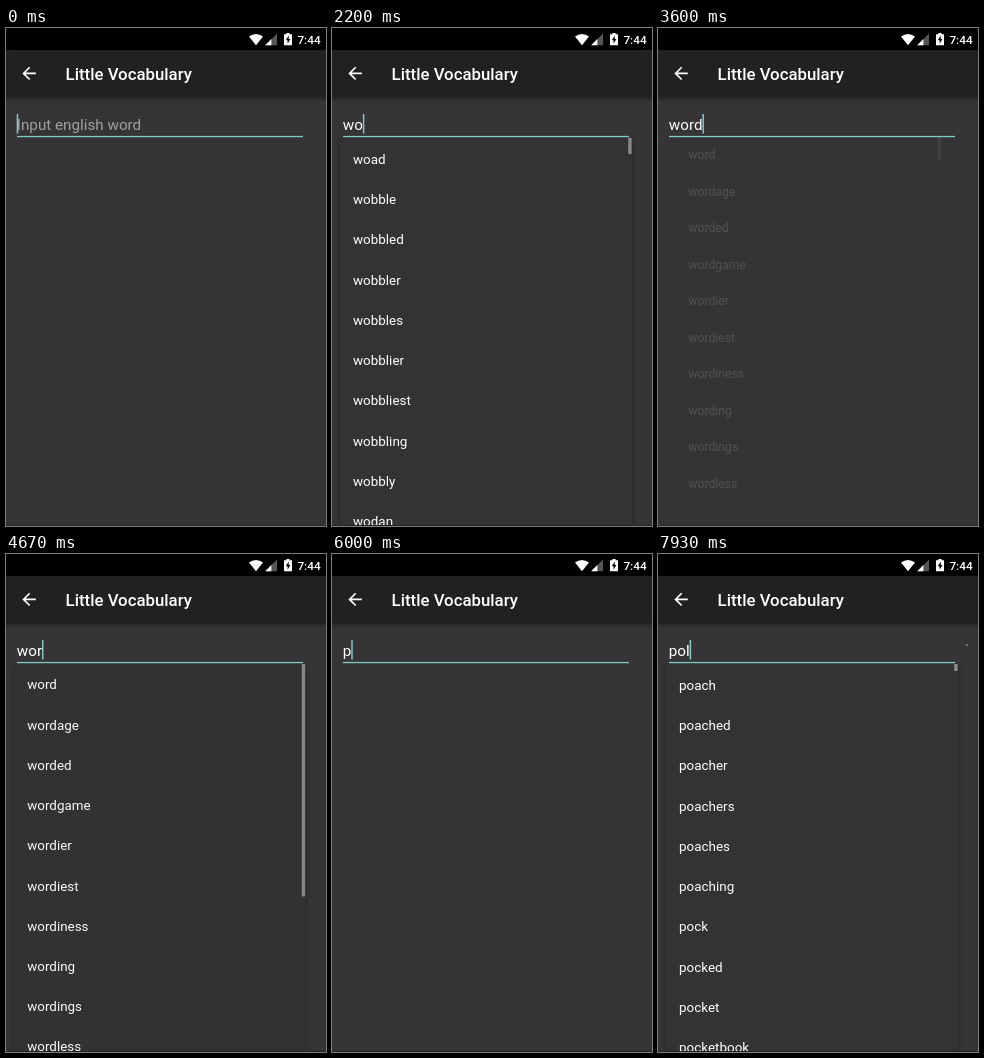
An HTML page that plays this animation: 320 by 498 pixels, repeating every 8 s.

```html
<!DOCTYPE html>
<html lang="en">
<head>
<meta charset="utf-8">
<title>Little Vocabulary</title>
<style>
  html, body { margin: 0; width: 100%; height: 100%; overflow: hidden; background: #373437; }
  svg { display: block; width: 320px; height: 498px; font-family: Roboto, sans-serif; fill: #fff; }
  .field { font-size: 15.22px; }
  #list { font-size: 13.44px; }
</style>
</head>
<body>
<svg viewBox="0 0 320 498">
  <defs>
    <linearGradient id="fall" x1="0" y1="0" x2="0" y2="1">
      <stop offset="0" stop-opacity=".3"/><stop offset="1" stop-opacity="0"/>
    </linearGradient>
    <filter id="blur" x="-10%" y="-10%" width="120%" height="120%"><feGaussianBlur stdDeviation="2.5"/></filter>
    <clipPath id="win"><rect x="0" y="109.5" width="310" height="390"/></clipPath>
  </defs>

  <rect width="320" height="498" fill="#373437"/>

  <!-- status bar -->
  <rect width="320" height="22" fill="#000"/>
  <path d="M243 8.6Q250 3.4 257 8.6L250 17.2Z"/>
  <path d="M271 5.6V17.2H259.2Z" fill="#555"/>
  <path d="M265.4 11.1V17.2H259.2Z"/>
  <path d="M280.4 5H283.6V6.2H286V17.2H278V6.2H280.4Z"/>
  <path d="M282.7 7.6L279.8 12.3H281.6V15.8L284.4 11H282.7Z" fill="#000"/>
  <text x="291.4" y="16.2" font-size="11.8" font-weight="500">7:44</text>

  <!-- app bar -->
  <rect y="22" width="320" height="47" fill="#232023"/>
  <rect y="69" width="320" height="5" fill="url(#fall)"/>
  <path transform="translate(13 35.3) scale(.84)"
    d="M20 11H7.83l5.59-5.59L12 4l-8 8 8 8 1.41-1.41L7.83 13H20z"/>
  <text x="59.6" y="52" font-size="16.8" font-weight="500">Little Vocabulary</text>

  <!-- suggestions -->
  <g id="popup" clip-path="url(#win)">
    <rect x="8" y="111" width="292" height="400" fill="#000" opacity=".35" filter="url(#blur)"/>
    <rect x="8" y="109.5" width="292" height="400" fill="#353235"/>
    <g id="list"></g>
    <rect id="thumb" x="296.2" y="110" width="3.4" fill="#8b898b"/>
  </g>

  <!-- input -->
  <text id="hint" class="field" x="10.8" y="102" fill="#a09ea0">Input english word</text>
  <text id="typed" class="field" x="10.8" y="102"></text>
  <rect x="11" y="107.9" width="286" height="1.3" fill="#80cbc4"/>
  <rect id="cursor" y="86" width="1.5" height="19.5" fill="#80cbc4"/>
  <circle id="spin" cx="308" cy="96.5" r="5.4" pathLength="1" fill="none"
    stroke="#80cbc4" stroke-width="1.2" stroke-linecap="square"/>

  <rect y="497" width="320" height="1" fill="#252325"/>
</svg>
<script>
const LOOP = 8000, FPS = 15, BLINK = 505, FADE = 150, ROW = 40.3;
const $ = id => document.getElementById(id);
const [popup, list, thumb, hint, typed, cursor, spin] =
  ['popup', 'list', 'thumb', 'hint', 'typed', 'cursor', 'spin'].map($);

const words = {
  wo: 'woad wobble wobbled wobbler wobbles wobblier wobbliest wobbling wobbly wodan',
  wor: 'word wordage worded wordgame wordier wordiest wordiness wording wordings wordless',
  po: 'poach poached poacher poachers poaches poaching pock pocked pocket pocketbook'
};
// [time, field content]
const edits = [[-440, ''], [465, 'w'], [1065, 'wo'], [2530, 'wor'], [3465, 'word'], [4465, 'wor'],
  [4950, 'wo'], [5130, 'w'], [5198, ''], [5998, 'p'], [7060, 'po'], [7865, 'pol']];
// [time, suggestions, thumb height]
const lists = [[0, 'wo', 16], [2660, 'wor', 233], [3470, 'wor', 27], [4400, 'wor', 233],
  [4950, 'wor', 28], [6000, 'po', 7]];
// [open, close]
const shows = [[1985, 3470], [4520, 4950], [7390, 9000]];
const spins = [[1140, 1730], [2570, 2660], [7130, 7330], [7895, 9000]];

const clamp = v => Math.min(1, Math.max(0, v));
const latest = (rows, t) => rows.filter(r => r[0] <= t).pop();
const during = (spans, t) => spans.find(([a, b]) => t >= a && t < b);

let shown = '';
function fill(key) {
  if (key === shown) return;
  shown = key;
  list.innerHTML = words[key].split(' ').map((w, i) =>
    `<text x="21" y="${(135.6 + i * ROW).toFixed(1)}">${w}</text>`).join('');
}

function drawPopup(t) {
  const [, key, size] = latest(lists, t);
  fill(key);
  thumb.setAttribute('height', size);
  const a = Math.max(...shows.map(([open, close]) =>
    Math.min(clamp((t - open) / FADE), clamp(1 - (t - close) / FADE))));
  const s = 0.893 + 0.107 * a;
  popup.setAttribute('opacity', a);
  popup.setAttribute('transform', `translate(122 86) scale(${s}) translate(-122 -86)`);
}

function drawField(t) {
  const [at, text] = latest(edits, t);
  typed.textContent = text;
  hint.setAttribute('opacity', text ? 0 : 1);
  const w = text ? typed.getComputedTextLength() : 0;
  cursor.setAttribute('x', 10.7 + w);
  cursor.setAttribute('opacity', Math.floor((t - at) / BLINK) % 2 ? 0 : 1);
}

function drawSpin(t) {
  const span = during(spins, t);
  spin.setAttribute('opacity', span ? 1 : 0);
  if (!span) return;
  const age = t - span[0], p = clamp(age / 667);
  const arc = 0.75 * (1 - (1 - p * p) ** 5.3);
  const turn = age * 720 / 6665 + age * 90 / 1333 - 90;
  spin.setAttribute('stroke-dasharray', `${Math.max(arc, 0.01)} 2`);
  spin.setAttribute('transform', `rotate(${turn} 308 96.5)`);
}

function draw(ms) {
  const t = Math.floor((ms % LOOP + 4) * FPS / 1000) * 1000 / FPS;
  drawPopup(t);
  drawField(t);
  drawSpin(t);
}

const start = performance.now();
function tick() {
  draw(performance.now() - start);
  requestAnimationFrame(tick);
}
tick();
</script>
</body>
</html>
```
